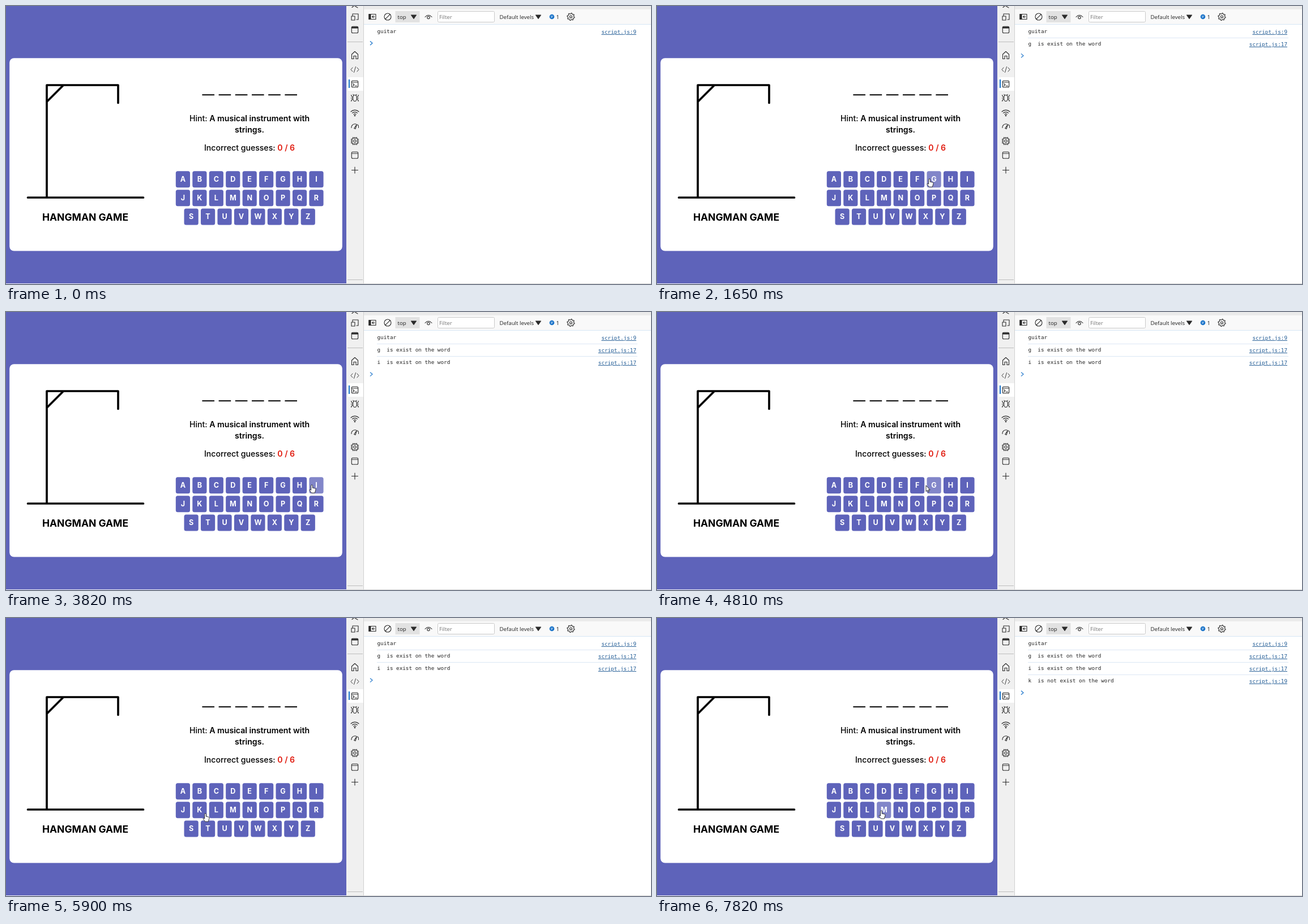
Recreate the animation shown at these times as an HTML page. Size 1139 by 492 pixels, loop 8000 ms.

```html
<!DOCTYPE html>
<html lang="en">
<head>
<meta charset="utf-8">
<title>Hangman Game</title>
<style>
  html, body { margin: 0; width: 100%; height: 100%; overflow: hidden; background: #fff; }
  svg { display: block; }
  text { white-space: pre; }
  .game { font: 500 14.1px Inter, "Open Sans", sans-serif; text-anchor: middle; }
  .game .b { font-weight: 600; }
  .title { font-size: 17.5px; font-weight: 700; }
  .gallows { fill: none; stroke: #000; stroke-width: 3.7; stroke-linecap: round; stroke-linejoin: round; }
  .key rect { fill: #5e63ba; }
  .key.on rect { fill: #8286c9; }
  .key text { font-size: 12.6px; font-weight: 700; fill: #fff; }
  .ui { font: 9.7px "Open Sans", "Noto Sans", sans-serif; fill: #222; }
  .log { font: 9.3px "DejaVu Sans Mono", "Noto Sans Mono", monospace; fill: #222; }
  .link { fill: #1f5a94; text-anchor: end; text-decoration: underline; }
  .icon { fill: none; stroke: #2b2b2b; stroke-width: 1.1; stroke-linecap: round; stroke-linejoin: round; }
  .solid { fill: #2b2b2b; }
  .cursor { fill: #fff; stroke: #222; stroke-width: .9; stroke-linejoin: round; }
</style>
</head>
<body>
<svg width="1139" height="492" viewBox="0 0 1139 492">
  <rect width="601" height="491" fill="#5e63ba"/>
  <rect x="6.2" y="92.2" width="587.6" height="341.4" rx="8" fill="#fff"/>
  <path class="gallows" d="M38.5 339H242.5M72 339V140H198V171.5M101 140.5L72.5 169"/>

  <g class="game" id="game">
    <text class="title" x="140" y="380">HANGMAN GAME</text>
    <text x="430" y="204">Hint: <tspan class="b">A musical instrument with</tspan></text>
    <text class="b" x="430" y="224">strings.</text>
    <text x="430" y="256">Incorrect guesses: <tspan class="b" fill="#e0180c">0 / 6</tspan></text>
  </g>

  <!-- tool sidebar -->
  <rect x="601" width="31" height="491" fill="#f0f0f0"/>
  <path d="M631.5 0V491" stroke="#d0d0d0"/>
  <path d="M603 63.5H630M603 484.5H630" stroke="#bdbdbd"/>
  <rect x="604" y="126" width="27" height="24" fill="#fff"/>
  <rect x="605" y="130" width="2" height="15" fill="#1a73c9"/>

  <!-- console toolbar -->
  <rect x="632" width="507" height="32" fill="#f9f9f9"/>
  <rect x="632" width="507" height="6" fill="#ebebeb"/>
  <path d="M632 32.5H1139" stroke="#d7e6f5"/>
  <rect x="687.5" y="9" width="43" height="20" fill="#e2e2e2"/>
  <rect x="762.5" y="9.5" width="100" height="19" rx="2" fill="#fff" stroke="#c9c9c9"/>
  <circle cx="964" cy="19" r="4.3" fill="#1a73c9"/>
  <path d="M962 18H966M962 20H965" stroke="#fff" stroke-width=".8"/>
  <g class="ui">
    <text x="691.5" y="23">top</text>
    <text x="765" y="23" fill="#777">Filter</text>
    <text x="871.5" y="23">Default levels</text>
    <text x="971.5" y="23">1</text>
  </g>

  <g id="icons" class="icon"></g>
  <g id="logs" class="log"></g>
  <path id="prompt" d="M643 -3.5L647 0L643 3.5" fill="none" stroke="#1a73c9" stroke-width="1.2"/>
  <path d="M0 491.5H601" stroke="#f2f2f6"/>
  <path d="M601 491.5H1139" stroke="#d5d5d5"/>

  <g id="cursor" class="cursor">
    <path id="hand" d="M-1.3 1.3A1.3 1.3 0 0 1 1.3 1.3V5.2L5.4 6Q7.2 6.5 7 8.4L5.3 14.2H-.4L-3.8 9.8Q-4.4 8.2-2.8 8.2L-1.3 9.4Z"/>
    <path id="arrow" d="M0 0V10.6L2.4 8.4 4 12 5.5 11.3 4 7.8H7.2Z"/>
  </g>
</svg>
<script>
const LOOP = 8000, HOVER_LAG = 30;
const $ = id => document.getElementById(id);
const range = n => Array.from({ length: n }, (_, i) => i);

function add(parent, tag, attrs, text) {
  const el = document.createElementNS("http://www.w3.org/2000/svg", tag);
  for (const k in attrs) el.setAttribute(k, attrs[k]);
  if (text) el.textContent = text;
  return parent.appendChild(el);
}

// offset of item i in a centred run of n
const spread = (i, n, step) => (i - (n - 1) / 2) * step;

// ---- game panel ----
const CENTER = 430.2, STEP = 29.45, ROW = 33.05, KEY_W = 25.2, KEY_H = 29;

add($("game"), "path", {
  d: range(6).map(i => `M${CENTER + spread(i, 6, 29.2) - 10.8} 157.2h21.6`).join(""),
  stroke: "#000", "stroke-width": 1.9
});

const keys = [..."ABCDEFGHIJKLMNOPQRSTUVWXYZ"].map((letter, i) => {
  const row = Math.floor(i / 9), count = Math.min(9, 26 - row * 9);
  const cx = CENTER + spread(i % 9, count, STEP);
  const x = cx - KEY_W / 2, y = 292.3 + row * ROW;
  const el = add($("game"), "g", { class: "key" });
  add(el, "rect", { x, y, width: KEY_W, height: KEY_H, rx: 3.5 });
  add(el, "text", { x: cx, y: y + 18.9 }, letter);
  return { el, x, y };
});

// ---- icons, each drawn around its own centre ----
function icon(x, y, d, attrs) {
  const g = add($("icons"), "g", { transform: `translate(${x} ${y})` });
  if (d) add(g, "path", { d, ...attrs });
  return g;
}
const circle = (g, r, cy = 0) => add(g, "circle", { r, cy });
const box = (g, s) => add(g, "rect", { x: -s, y: -s, width: 2 * s, height: 2 * s, rx: 2 });
const SIDE = 616;

icon(SIDE, 0, "M-5 2.5L-2 0M0 0L5 3");
icon(SIDE, 20, "M-4-2V-6H6V4H3M-6-2H0V5H-6Z");
[42, 138, 264].forEach(y => box(icon(SIDE, y, "M-5.5-3H5.5"), 5.7));
icon(SIDE, 42, "M-5-4H5", { "stroke-width": 2.5 });
icon(SIDE, 87, "M-5.5-1.5L0-6.5 5.5-1.5V6.5H2V1.5H-2V6.5H-5.5Z");
icon(SIDE, 112.5, "M-4-3.5L-7 0-4 3.5M4-3.5L7 0 4 3.5M1.5-5L-1.5 5", { "stroke-width": 0.9 });
icon(SIDE, 138, "M-3.5-.5L-1 1.5-3.5 3.5M.5 3.5H3.5");
icon(SIDE, 290.5, "M0-5.5V5.5M-5.5 0H5.5");

const bug = icon(SIDE, 163);
add(bug, "ellipse", { rx: 3.5, ry: 5.5 });
[-1, 1].forEach(s => add(bug, "path", {
  d: "M3.5 0H6.5M3.3-2Q6.3-2.5 6.3-5.5M3.3 2Q6.3 2.5 6.3 5.5M2-4.5L3-6.5", transform: `scale(${s} 1)`
}));

const wifi = icon(SIDE, 194);
circle(wifi, 0.8);
[3, 6.5, 10].forEach(r => {
  const c = r * 0.7;
  add(wifi, "path", { d: `M${-c} ${-c}A${r} ${r} 0 0 1 ${c} ${-c}` });
});

icon(SIDE, 213, "M-6 2.5A6.2 6.2 0 0 1 2-4M5-3Q7-1 6.5 2.5M-1.3 3.5L3.5-3.5 1 4.5Z");

const chip = icon(SIDE, 239);
box(chip, 5);
circle(chip, 2.2);
range(12).forEach(i => add(chip, "path", {
  d: `M${spread(i % 3, 3, 3)}-5V-6.8`, transform: `rotate(${90 * Math.floor(i / 3)})`
}));

icon(647, 19, "M-6-4.5H6V4.5H-6ZM4 0H0M1.5-1.8L-.3 0 1.5 1.8");
icon(643, 19, "M-2-4.5H1V4.5H-2Z", { class: "solid" });
circle(icon(674, 19, "M-4.2 4.2L4.2-4.2"), 6);
circle(icon(746, 19, "M-6 .5Q0-6 6 .5"), 2.2, 1.5);
[720, 940].forEach(x => icon(x, 19, "M-4.5-3H4.5L0 3.5Z", { class: "solid" }));

const teeth = range(32).map(i => {
  const a = (i + 0.5) * Math.PI / 16, r = i % 4 < 2 ? 6.6 : 5;
  return [r * Math.cos(a), r * Math.sin(a)];
});
circle(icon(997.5, 19, `M${teeth.join("L")}Z`), 2);

// ---- console ----
const lines = [
  [0, "guitar", 9],
  [1650, "g  is exist on the word", 17],
  [3820, "i  is exist on the word", 17],
  [6580, "k  is not exist on the word", 19]
].map(([at, text, no], i) => {
  const y = 48 + i * 22, el = add($("logs"), "g", {});
  if (i) add(el, "path", { d: `M655 ${y - 13.5}H1115`, stroke: "#dbe7f4" });
  add(el, "text", { x: 655.5, y }, text);
  add(el, "text", { x: 1113, y: y + 1, class: "link" }, "script.js:" + no);
  return { at, el };
});

// ---- pointer: each move runs from start to end and stops at x, y ----
const ENTRY = [1056, 484];
const moves = [
  [20, 260, 342, 338],
  [420, 740, 403, 337],
  [740, 1390, 481, 306],
  [3310, 3450, 537, 306],
  [3590, 3650, 540, 306],
  [4080, 4870, 469.5, 307],
  [4900, 5900, 352, 346],
  [5900, 6050, 342, 339],
  [7220, 7820, 396, 341]
];

function pointAt(t) {
  if (t < moves[0][0]) return null;
  let [x, y] = ENTRY;
  for (const [from, to, tx, ty] of moves) {
    const k = Math.min(1, Math.max(0, (t - from) / (to - from)));
    x += (tx - x) * k;
    y += (ty - y) * k;
  }
  return [x, y];
}

const keyAt = p => p && keys.find(k =>
  p[0] >= k.x && p[0] <= k.x + KEY_W && p[1] >= k.y && p[1] <= k.y + KEY_H);

const show = (el, on) => el.setAttribute("visibility", on ? "visible" : "hidden");

function draw(t) {
  const p = pointAt(t), over = keyAt(p), lit = keyAt(pointAt(t - HOVER_LAG));
  keys.forEach(k => k.el.classList.toggle("on", k === lit));
  show($("hand"), p && over);
  show($("arrow"), p && !over);
  if (p) $("cursor").setAttribute("transform", `translate(${p.map(Math.round)})`);

  lines.forEach(l => show(l.el, t >= l.at));
  const count = lines.filter(l => t >= l.at).length;
  $("prompt").setAttribute("transform", `translate(0 ${43.5 + count * 22.2})`);
}

const start = performance.now();
function tick() {
  draw((performance.now() - start) % LOOP);
  requestAnimationFrame(tick);
}
draw(0);
requestAnimationFrame(tick);
</script>
</body>
</html>
```
